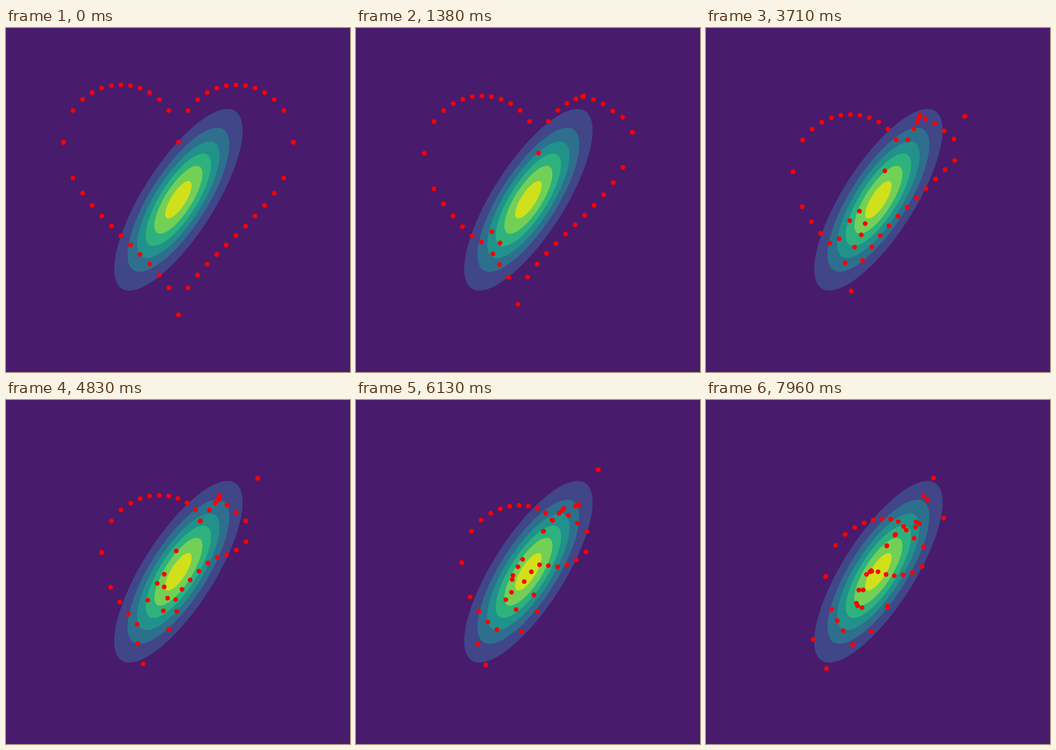
Recreate the animation shown at these times as an HTML page with a canvas. Size 748 by 748 pixels, loop 8000 ms.

```html
<!DOCTYPE html>
<html lang="en">
<head>
<meta charset="utf-8">
<title>Particles flowing to a Gaussian</title>
<style>
  html, body { margin: 0; width: 100%; height: 100%; overflow: hidden; background: #481b6d; }
  canvas { display: block; width: 748px; height: 748px; }
</style>
</head>
<body>
<canvas id="stage" width="748" height="748"></canvas>
<script>
const ctx = document.getElementById('stage').getContext('2d');

const SIZE = 748, UNIT = 125, CX = 374.9, CY = 373.5, DOT = 5.2;
const LOOP = 8000, FPS = 24, FRAMES = 192;
const BACK = '#481b6d';
const BANDS = ['#404688', '#2e6f8e', '#21918c', '#2db27d', '#73d056', '#d0e11c'];
const PEAK = 6.495; // density at the centre, in contour steps

// Covariance and precision of the Gaussian
const VX = 1 / 3, VY = 2 / 3, VXY = 0.36;
const DET = VX * VY - VXY * VXY;
const PXX = VY / DET, PYY = VX / DET, PXY = -VXY / DET;

// Optimiser
const RATE = 0.003, DECAY = 0.9, FUDGE = 1e-6, STEPS_PER_FRAME = 2;

function heart() {
  const top = [], bottom = [];
  for (let k = -12; k <= 12; k++) {
    const x = k / 6, a = Math.abs(k);
    top.push([x, 1 + Math.sqrt(Math.max(0, 1 - (a / 6 - 1) ** 2))]);
    bottom.push([x, 1 - 3 * Math.sqrt(1 - Math.sqrt(a / 12))]);
  }
  return top.concat(bottom);
}

function median(values) {
  const s = values.slice().sort(), m = s.length >> 1;
  return (s[m - 1] + s[m]) / 2;
}

// Stein variational gradient with an RBF kernel and median bandwidth
function gradient(pts) {
  const n = pts.length, dist = new Float64Array(n * n);
  for (let i = 0; i < n; i++) {
    for (let j = 0; j < n; j++) {
      dist[i * n + j] = (pts[i][0] - pts[j][0]) ** 2 + (pts[i][1] - pts[j][1]) ** 2;
    }
  }
  const width = median(dist) / Math.log(n + 1);
  const score = pts.map(([x, y]) => [-PXX * x - PXY * y, -PXY * x - PYY * y]);
  return pts.map((p, i) => {
    const g = [0, 0];
    for (let j = 0; j < n; j++) {
      const k = Math.exp(-dist[i * n + j] / width);
      for (let c = 0; c < 2; c++) {
        g[c] += k * (score[j][c] + 2 * (p[c] - pts[j][c]) / width) / n;
      }
    }
    return g;
  });
}

function simulate() {
  let pts = heart(), hist = null;
  const frames = [pts];
  while (frames.length < FRAMES) {
    for (let s = 0; s < STEPS_PER_FRAME; s++) {
      const grad = gradient(pts);
      hist = grad.map((g, i) => g.map((v, c) =>
        hist ? DECAY * hist[i][c] + (1 - DECAY) * v * v : v * v));
      pts = pts.map((p, i) => p.map((v, c) =>
        v + RATE * grad[i][c] / (FUDGE + Math.sqrt(hist[i][c]))));
    }
    frames.push(pts);
  }
  return frames;
}

function drawContours() {
  const mid = (VX + VY) / 2, spread = Math.hypot((VX - VY) / 2, VXY);
  const major = Math.sqrt(mid + spread), minor = Math.sqrt(mid - spread);
  const angle = -Math.atan2(2 * VXY, VX - VY) / 2;
  BANDS.forEach((color, i) => {
    const r = UNIT * Math.sqrt(2 * Math.log(PEAK / (i + 1)));
    ctx.fillStyle = color;
    ctx.beginPath();
    ctx.ellipse(CX, CY, r * major, r * minor, angle, 0, 2 * Math.PI);
    ctx.fill();
  });
}

function drawDots(pts) {
  ctx.fillStyle = '#ff0000';
  for (const [x, y] of pts) {
    ctx.beginPath();
    ctx.arc(CX + UNIT * x, CY - UNIT * y, DOT, 0, 2 * Math.PI);
    ctx.fill();
  }
}

const frames = simulate();
const start = performance.now();

function render() {
  const t = (performance.now() - start) % LOOP;
  const index = Math.min(FRAMES - 1, Math.floor((t + 4) * FPS / 1000));
  ctx.fillStyle = BACK;
  ctx.fillRect(0, 0, SIZE, SIZE);
  drawContours();
  drawDots(frames[index]);
  requestAnimationFrame(render);
}
render();
</script>
</body>
</html>
```
